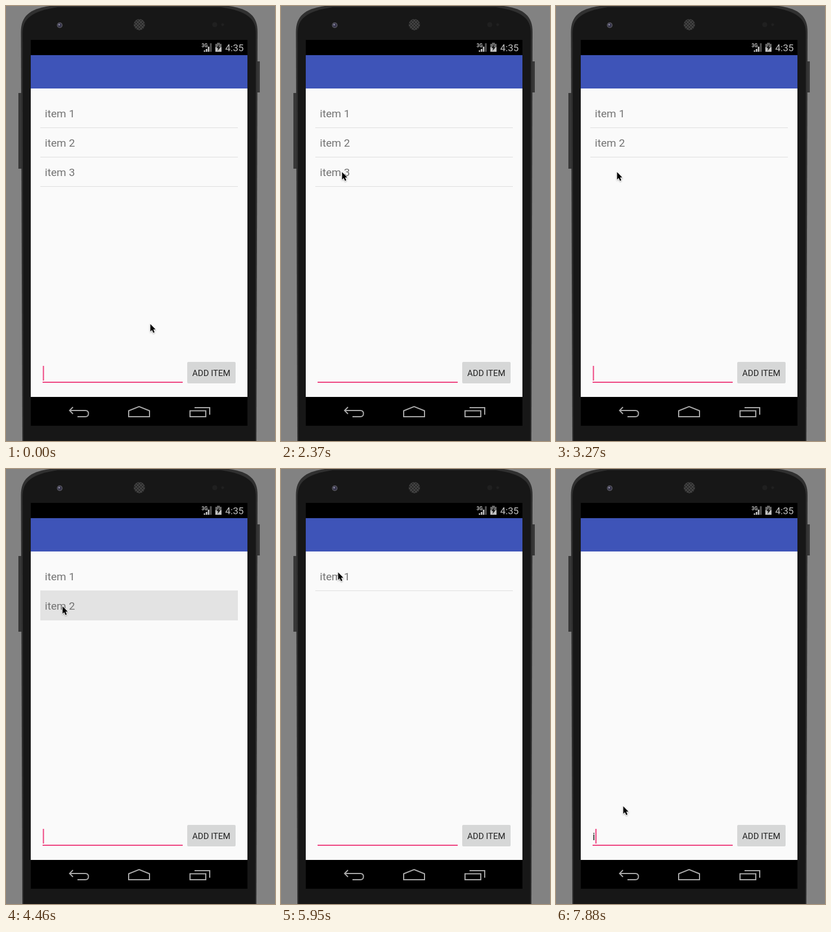
Recreate the animation shown at these times as an HTML page. Size 478 by 770 pixels, loop 8000 ms.

```html
<!DOCTYPE html>
<html lang="en">
<head>
<meta charset="utf-8">
<title>Item list</title>
<style>
html, body { margin: 0; width: 100%; height: 100%; overflow: hidden; background: #828282 }
svg { display: block; width: 478px; height: 770px; font-family: Roboto, sans-serif }
</style>
</head>
<body>
<svg viewBox="0 0 478 770">
  <defs>
    <pattern id="mesh" width="4" height="4" patternUnits="userSpaceOnUse" patternTransform="rotate(45 237 33)">
      <rect width="4" height="4" fill="#444"/><circle cx="2" cy="2" r="1.3" fill="#1c1c1c"/>
    </pattern>
    <filter id="shadow" x="-50%" y="-50%" width="200%" height="200%">
      <feDropShadow dx="0" dy="1" stdDeviation="1" flood-opacity=".4"/>
    </filter>
  </defs>

  <g id="phone">
    <path d="M22 154h6v134h-6zM445 98h6v55h-6z" fill="#383838"/>
    <path d="M29 770L26.500 46C26.500 18 42 5 78 0H396C432 5 447 18 447 46L445 770Z" fill="#303030"/>
    <path d="M31 770L29.500 48C29.500 22 46 9 92 2H382C428 9 444 22 444 48L443 770Z" fill="#171717"/>
    <circle cx="95.500" cy="34" r="5" fill="#55555c"/>
    <circle cx="95.500" cy="34" r="3.500" fill="#35334a"/>
    <circle cx="94.500" cy="33" r="1.600" fill="#8d8aa2"/>
    <circle cx="237" cy="33" r="10" fill="url(#mesh)"/>
    <circle cx="371" cy="33" r="4.500" fill="#202020"/><circle cx="385" cy="33" r="2.500" fill="#202020"/>
  </g>

  <g id="chrome">
    <path d="M44 60h385v683H44z"/>
    <path d="M44 87h385v60H44z" fill="#3e54b8"/>
    <path d="M44 146h385v546H44z" fill="#fafafa"/>
    <text x="347.500" y="73" font-size="8.500" font-weight="700" fill="#c4c4c4">3G</text>
    <path d="M351.500 81v-2.500h2.500V81zm3.500 0v-5h2.700v5zm3.600 0v-9h2.800v9z" fill="#c4c4c4"/>
    <path d="M362.400 81V66h3.100v15z" fill="#555"/>
    <path d="M375 65h5v2h3v14h-11V67h3z" fill="#686868"/>
    <path d="M372 73h11v8h-11z" fill="#c0c0c0"/>
    <path d="M379 68l-5 6.500h3l-1 5 5-6.500h-3z" fill="#111"/>
    <text x="389.500" y="80" font-size="17" fill="#c2c2c2">4:35</text>
    <g fill="none" stroke="#aaa" stroke-width="2">
      <path d="M119 710l-6 6 6 6M113 716h28q5.500 0 5.500 5.500t-5.500 5.500h-14"/>
      <path d="M218 727v-10.500l18.500-7.500 18.500 7.500V727z"/>
      <path d="M327 716.500h28V727h-28zM335 711h27v12.500"/>
    </g>
  </g>

  <g id="list" font-size="19.2" fill="#737373"></g>

  <path d="M65 666h249" stroke="#ee427f" stroke-width="2"/>
  <text id="typed" x="65" y="657" font-size="19.2" fill="#222"></text>
  <path id="caret" d="M0 637h2v26h-2z" fill="#ee427f"/>
  <rect x="322" y="630" width="86" height="38" rx="2" fill="#d6d7d7"/>
  <text x="331" y="655" font-size="15" fill="#222">ADD ITEM</text>

  <path id="pointer" d="M0 0V13.200L3 10.400 5.200 15.600 7.500 14.600 5.300 9.600H9.300Z"
    stroke="#fff" stroke-width="1.400" paint-order="stroke" filter="url(#shadow)"/>
</svg>

<script>
const LOOP = 8000, TICK = 148.6, LEAD = 8;
const BLINK = 3, LONG_PRESS = 3, TYPED_AT = 53;
const CARET_RESTARTS = [1, 22, 24, 31, TYPED_AT];
const START = { x: 256.500, y: 563 };
const MOVES = [
  { from: 0, to: 4, x: 163, y: 231 },
  { from: 5, to: 7, x: 145, y: 221 },
  { from: 7, to: 9, x: 108.500, y: 294 },
  { from: 25, to: 30, x: 100.500, y: 243 },
  { from: 37, to: 38, x: 101.500, y: 183 },
  { from: 45, to: 50, x: 119.500, y: 597 }
];

const $ = id => document.getElementById(id);
const smooth = u => u * u * (3 - 2 * u);

// Items are removed from the bottom up, one every 11 ticks.
const rows = [0, 1, 2].map(i => {
  const row = document.createElementNS('http://www.w3.org/2000/svg', 'g');
  const top = Math.round(163 + i * 52.2);
  row.innerHTML = `
    <path d="M61 ${top + 52}.500h351" stroke="#dedede"/>
    <rect x="61" y="${top}" width="351" height="53"/>
    <text x="69" y="${top + 33.500}">item ${i + 1}</text>`;
  $('list').append(row);
  return { row, press: row.querySelector('rect'), pressedAt: 41 - 11 * i };
});

function pointerAt(tick) {
  let { x, y } = START;
  for (const move of MOVES) {
    const u = smooth(Math.min(1, Math.max(0, (tick - move.from) / (move.to - move.from))));
    x += (move.x - x) * u;
    y += (move.y - y) * u;
  }
  return `translate(${x} ${y})`;
}

function caretOn(tick) {
  const restart = CARET_RESTARTS.findLast(r => r <= tick) ?? tick;
  return Math.floor((tick - restart) / BLINK) % 2 === 0;
}

function draw(tick) {
  $('pointer').setAttribute('transform', pointerAt(tick));

  for (const { row, press, pressedAt } of rows) {
    const held = tick - pressedAt;
    row.style.display = held < LONG_PRESS ? '' : 'none';
    press.setAttribute('fill', held < 0 ? 'none' : `hsl(0 0% ${89 - 3.5 * held}%)`);
  }

  const typing = tick >= TYPED_AT;
  $('typed').textContent = typing ? 'i' : '';
  $('caret').style.display = caretOn(tick) ? '' : 'none';
  $('caret').setAttribute('transform', `translate(${typing ? 70 : 65.500})`);
}

function animate() {
  draw(Math.floor((performance.now() % LOOP + LEAD) / TICK));
  requestAnimationFrame(animate);
}
animate();
</script>
</body>
</html>
```
